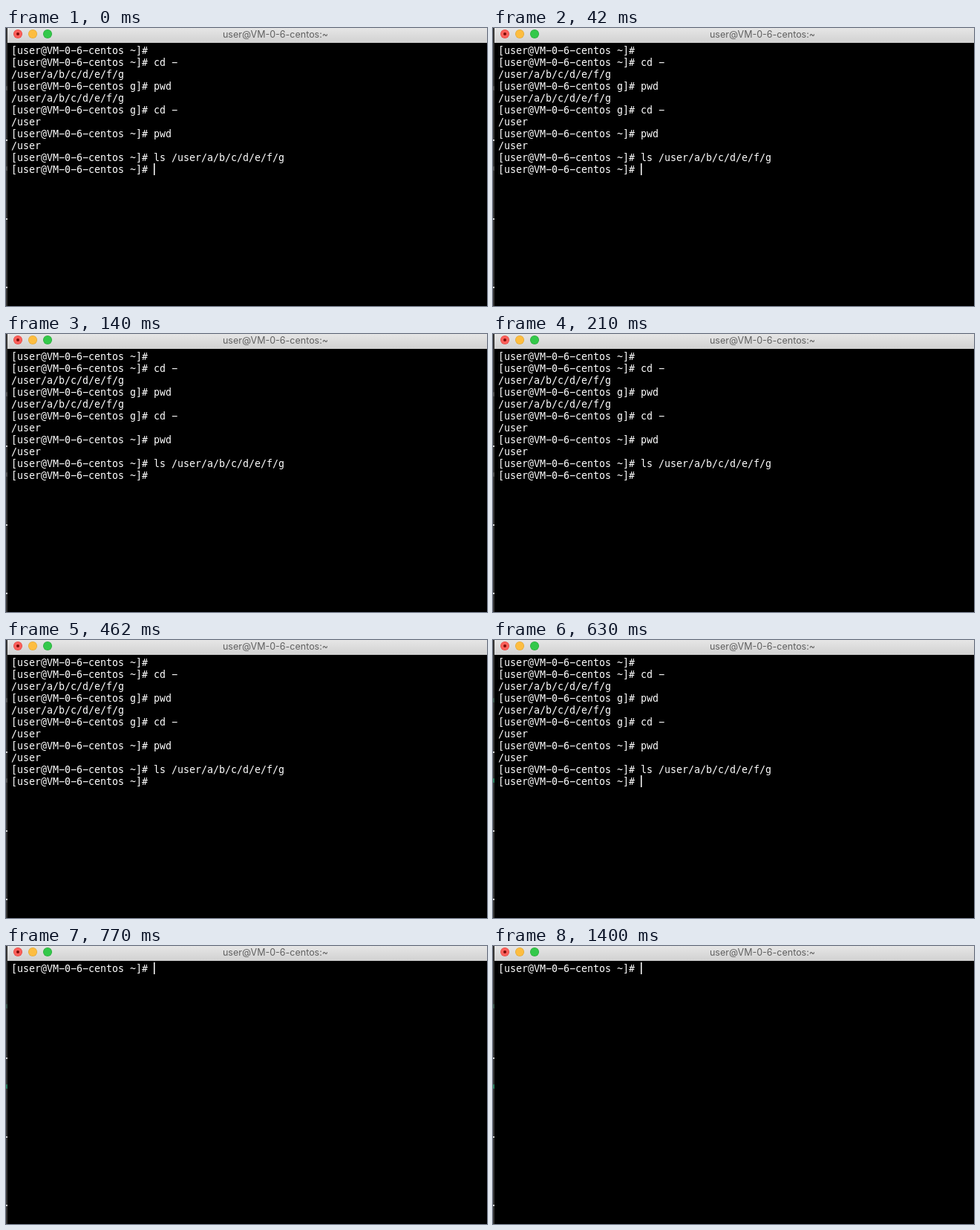
An HTML page with a canvas for the animation above (1.82 s loop, 648x374 px).

```html
<!DOCTYPE html>
<html lang="en">
<head>
<meta charset="utf-8">
<title>Terminal</title>
<style>
  html, body { margin: 0; width: 100%; height: 100%; overflow: hidden; background: #000; }
  canvas { display: block; }
</style>
</head>
<body>
<canvas id="stage" width="648" height="374"></canvas>
<script>
const ctx = document.getElementById('stage').getContext('2d');

const LOOP = 1820;
const CURSOR_OFF = 70;
const CURSOR_ON = 630;
const CLEARED = 770;

const LEFT = 7;
const CELL = 8;
const LINE = 16;
const FIRST_BASELINE = 35;

const host = 'user@VM-0-6-centos';
const prompt = (dir, command = '') => `[${host} ${dir}]# ${command}`;
const deep = '/user/a/b/c/d/e/f/g';
const history = [
  prompt('~'),
  prompt('~', 'cd -'),
  deep,
  prompt('g', 'pwd'),
  deep,
  prompt('g', 'cd -'),
  '/user',
  prompt('~', 'pwd'),
  '/user',
  prompt('~', 'ls ' + deep),
  prompt('~')
];

function rect(x, y, w, h, color) {
  ctx.fillStyle = color;
  ctx.fillRect(x, y, w, h);
}

function disc(x, y, r, color) {
  ctx.fillStyle = color;
  ctx.beginPath();
  ctx.arc(x, y, r, 0, Math.PI * 2);
  ctx.fill();
}

function drawBackdrop(lit) {
  rect(0, 0, 648, 374, '#000');
  rect(0, 0, 2, 374, '#353535');
  for (const y of [151, 257, 349]) rect(0, y - 1, 2, 2, '#d0d0d0');
  disc(2, 81, 3, lit ? '#3e5a4e' : '#555');
  disc(2, 189, 3, lit ? '#2c8060' : '#555');
  rect(2, 20, 646, 354, '#000');
}

function drawTitleBar() {
  const shade = ctx.createLinearGradient(0, 0, 0, 20);
  shade.addColorStop(0, '#e6e6e6');
  shade.addColorStop(1, '#d1d1d1');
  rect(2, 0, 646, 20, shade);

  [['#e2453d', '#fc605b'], ['#dfa532', '#fdbd40'], ['#27a537', '#34c84a']]
    .forEach(([edge, fill], i) => {
      disc(16 + i * 20, 8, 6, edge);
      disc(16 + i * 20, 8, 5.4, fill);
    });
  disc(16, 8, 2, '#7a0c08');

  ctx.font = '12.5px Inter, sans-serif';
  ctx.textAlign = 'center';
  ctx.fillStyle = '#606060';
  ctx.fillText(host + ':~', 363, 13);
}

// The terminal face has a wide hyphen, so the minus glyph stands for it.
function drawLine(text, row) {
  ctx.font = '13.29px "DejaVu Sans Mono", monospace';
  ctx.textAlign = 'left';
  ctx.fillStyle = '#fff';
  [...text.replaceAll('-', '\u2212')].forEach((char, column) => {
    ctx.fillText(char, LEFT + column * CELL, FIRST_BASELINE + row * LINE);
  });
}

function draw(time) {
  const lines = time < CLEARED ? history : [prompt('~')];
  const lastRow = lines.length - 1;

  drawBackdrop(time >= CURSOR_ON);
  drawTitleBar();
  lines.forEach(drawLine);

  if (time < CURSOR_OFF || time >= CURSOR_ON) {
    rect(LEFT + lines[lastRow].length * CELL, 22 + lastRow * LINE, 1.5, 16, '#fff');
  }
}

const start = performance.now();
function tick() {
  draw((performance.now() - start) % LOOP);
  requestAnimationFrame(tick);
}
tick();
</script>
</body>
</html>
```
